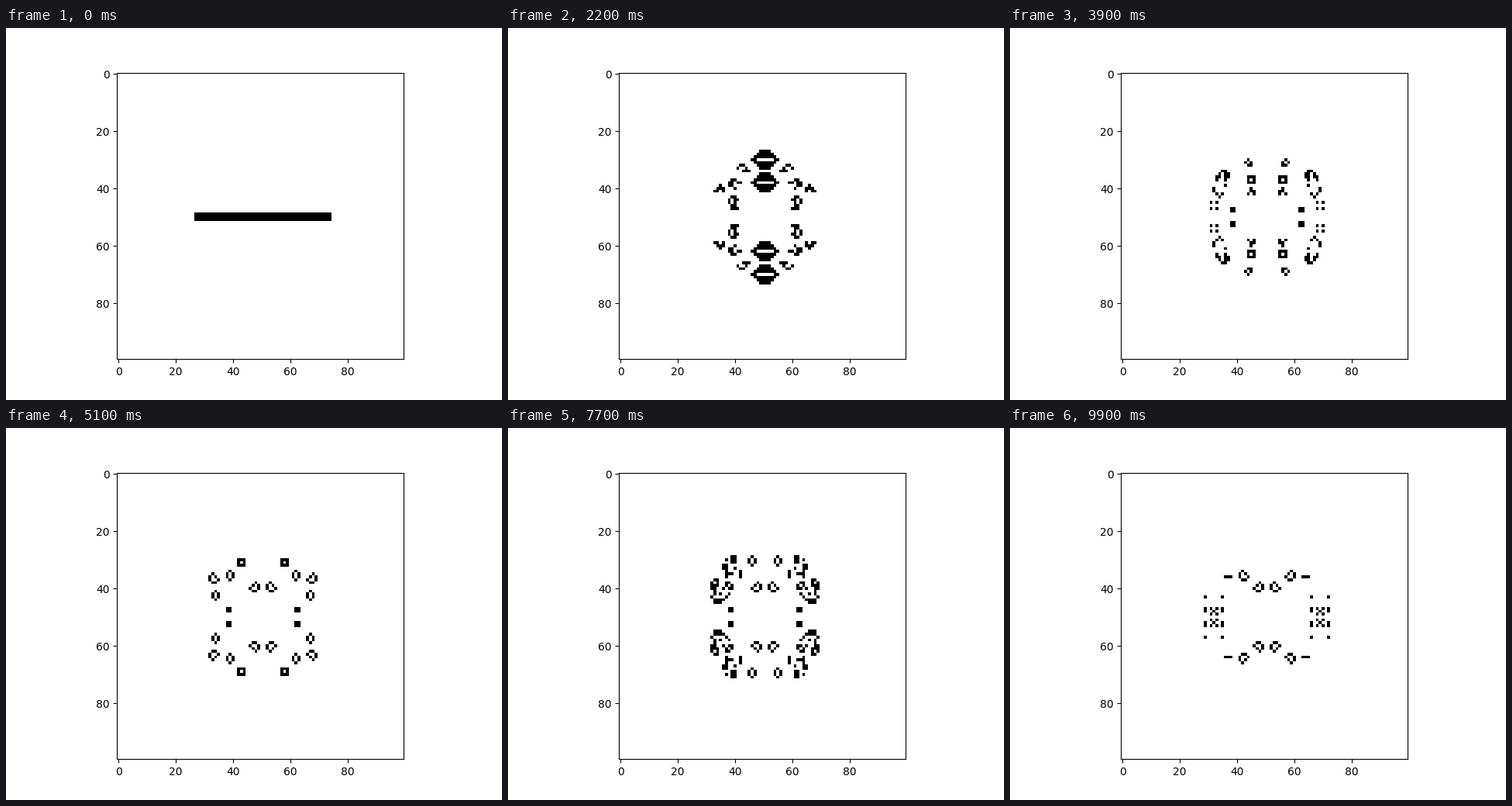
A matplotlib script for the animation above (10 s loop, 640 px wide and 480 px high).

```python
import matplotlib.pyplot as plt
import numpy as np
from matplotlib.animation import FuncAnimation

SIZE = 100
FRAMES = 100
INTERVAL = 100  # ms


def step(grid):
    """One generation of Conway's Game of Life on a wrapped grid."""
    neighbours = sum(
        np.roll(grid, (dy, dx), axis=(0, 1))
        for dy in (-1, 0, 1)
        for dx in (-1, 0, 1)
        if (dy, dx) != (0, 0)
    )
    return ((neighbours == 3) | ((grid == 1) & (neighbours == 2))).astype(int)


def evolve(grid, count):
    generations = [grid]
    while len(generations) < count:
        generations.append(step(generations[-1]))
    return generations


seed = np.zeros((SIZE, SIZE), dtype=int)
seed[49:52, 27:75] = 1
generations = evolve(seed, FRAMES)

fig, ax = plt.subplots(figsize=(6.4, 4.8), dpi=100)
image = ax.imshow(seed, cmap="binary", vmin=0, vmax=1, interpolation="nearest")


def update(i):
    image.set_data(generations[i])
    return (image,)


anim = FuncAnimation(fig, update, frames=FRAMES, interval=INTERVAL,
                     repeat=True, repeat_delay=0)
plt.show()
```
